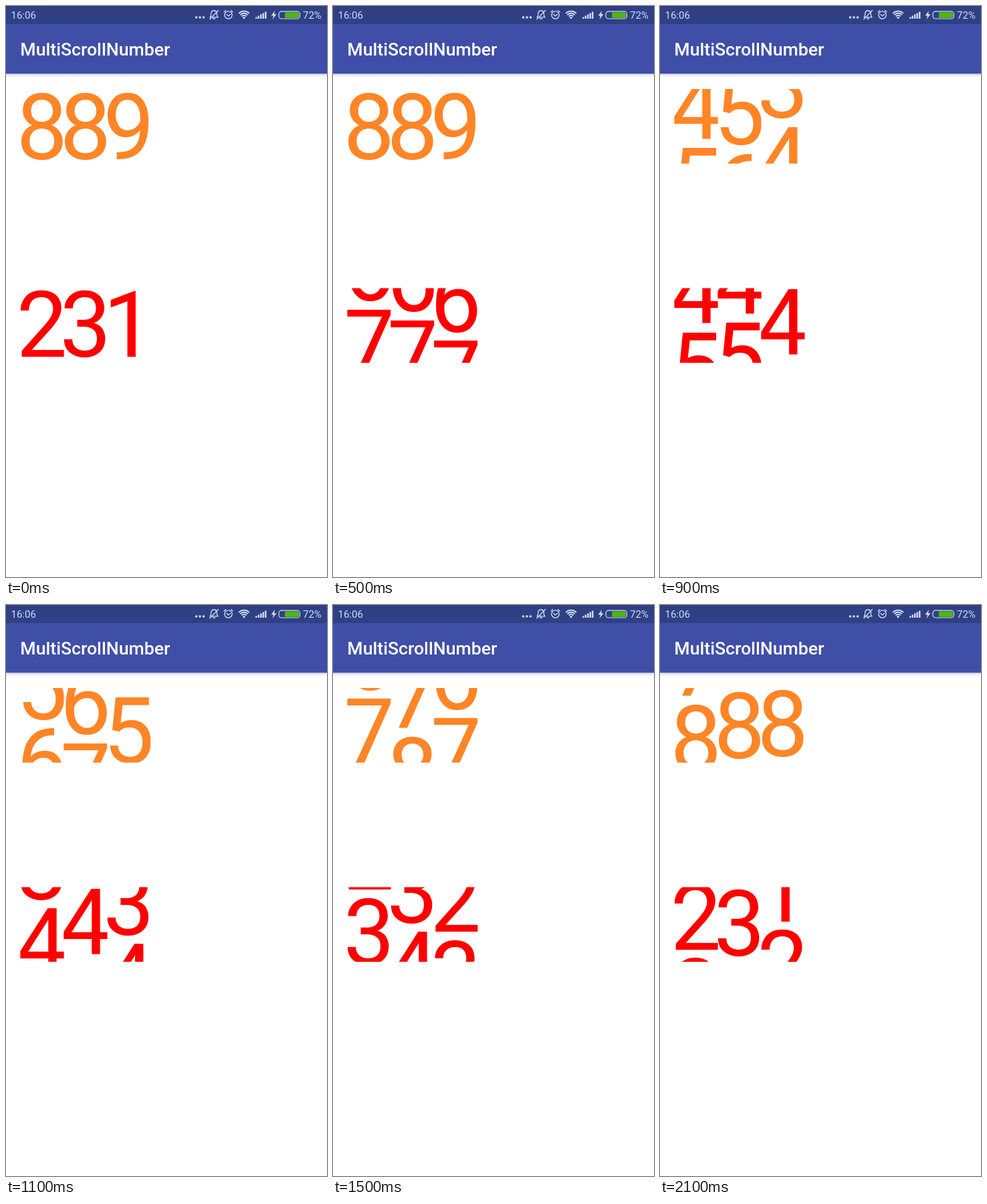
An HTML page with a canvas that plays this animation: 480x853 px, repeating every 2200 ms.

```html
<!DOCTYPE html>
<html lang="en">
<head>
<meta charset="utf-8">
<title>MultiScrollNumber</title>
<style>
html, body { margin: 0; width: 100%; height: 100%; overflow: hidden; background: #fff; }
canvas { display: block; width: 480px; height: 853px; }
</style>
</head>
<body>
<canvas id="stage" width="480" height="853"></canvas>
<script>
const ctx = document.getElementById('stage').getContext('2d');
const LOOP = 2200, STEP = 100;
const ROW = 111.5, COL = 64.9, LEFT = 21.4;
const FONT = 'Roboto, "Open Sans", sans-serif';
const INK = '#d3dcf5';

// Each reel holds its scroll position (in digits) at the counter's times.
const counters = [
  {
    color: '#ff8526', top: 124, base: 229.3,
    times: [540, 700, 1100, 1500, 1700, 2100],
    reels: [
      { goal: 8, pos: [1, 2.645, 5.525, 6.92, 7.245, 7.835] },
      { goal: 8, pos: [2, 3.64, 6.325, 7.405, 7.75, 8.45] },
      { goal: 9, pos: [0, 1.805, 4.94, 6.66, 7.205, 8.03] }
    ]
  },
  {
    color: '#ff0000', top: 421.5, base: 523.8,
    times: [220, 300, 700, 1100, 1500, 1700, 2100],
    reels: [
      { goal: 2, pos: [9, 8.36, 5.38, 3.755, 2.885, 2.61, 2.08] },
      { goal: 3, pos: [9, 8.195, 5.385, 4.02, 3.44, 3.148, 2.55] },
      { goal: 1, pos: [9, 8.028, 5.015, 3.28, 2.32, 1.955, 1.46] }
    ]
  }
];

// Monotone cubic through the points.
function spline(xs, ys, x) {
  const last = xs.length - 2;
  let i = 0;
  while (i < last && x >= xs[i + 1]) i++;
  const slope = k => (ys[k + 1] - ys[k]) / (xs[k + 1] - xs[k]);
  const tangent = k => {
    if (k === 0) return slope(0);
    if (k > last) return slope(last);
    const a = slope(k - 1), b = slope(k);
    return a * b > 0 ? 2 * a * b / (a + b) : 0;
  };
  const h = xs[i + 1] - xs[i], u = (x - xs[i]) / h, v = 1 - u;
  return v * v * (1 + 2 * u) * ys[i] + u * u * (3 - 2 * u) * ys[i + 1]
    + h * u * v * (v * tangent(i) - u * tangent(i + 1));
}

function position(reel, times, t) {
  if (t < times[0]) return reel.goal;
  const p = spline(times, reel.pos, t);
  return reel.pos[0] < reel.goal ? Math.min(p, reel.goal) : Math.max(p, reel.goal);
}

function drawCounter(c, t) {
  ctx.fillStyle = c.color;
  ctx.font = '136.5px ' + FONT;
  ctx.textAlign = 'center';
  c.reels.forEach((reel, i) => {
    const p = position(reel, c.times, t), n = Math.floor(p), x = LEFT + i * COL;
    ctx.save();
    ctx.beginPath();
    ctx.rect(x, c.top, COL + 0.3, ROW);
    ctx.clip();
    for (const d of [n, n + 1]) {
      ctx.fillText(d % 10, x + COL / 2, c.base + (d - p) * ROW);
    }
    ctx.restore();
  });
}

function label(text, x, y, font, color) {
  ctx.font = font + ' ' + FONT;
  ctx.textAlign = 'left';
  ctx.fillStyle = color;
  ctx.fillText(text, x, y);
}

function stroke(d, width = 1.4) {
  ctx.lineWidth = width;
  ctx.stroke(new Path2D(d));
}

function dot(x, y, r) {
  ctx.beginPath();
  ctx.arc(x, y, r, 0, 7);
  ctx.fill();
}

function pill(x, y, w, h, r) {
  ctx.beginPath();
  ctx.roundRect(x, y, w, h, r);
}

function drawIcons() {
  ctx.fillStyle = ctx.strokeStyle = INK;
  ctx.lineCap = ctx.lineJoin = 'round';
  for (const x of [284.5, 290, 295.5]) dot(x, 17, 1.8);

  // muted bell
  stroke('M305 16.8C307 15.5 306.5 13.5 306.7 11.5C307 5.5 315 5.5 315.3 11.5C315.5 13.5 315 15.5 317 16.8Z M309.5 19H312.5 M304.8 19.8L317.5 6.5', 1.3);

  // alarm clock
  ctx.beginPath();
  ctx.arc(332.5, 13.5, 5.6, 0, 7);
  ctx.lineWidth = 1.4;
  ctx.stroke();
  stroke('M330 12.5L332.5 15L335.5 12.5 M326 9L328.5 6.8 M339 9L336.5 6.8', 1.3);

  // wifi
  for (const r of [4, 7.2, 10.4]) {
    ctx.beginPath();
    ctx.arc(356, 18, r, -Math.PI * 0.75, -Math.PI * 0.25);
    ctx.lineWidth = 1.9;
    ctx.stroke();
  }
  dot(356, 17.6, 1.7);

  // signal
  for (let i = 0; i < 5; i++) {
    const h = 2.5 + i * 2;
    ctx.fillRect(373 + i * 3.5, 19 - h, 2.4, h);
  }

  ctx.fill(new Path2D('M402 7L396.5 14.5H400L398.5 20L404.5 12.3H401Z'));

  // battery
  pill(408, 8.2, 31.4, 10.8, 4);
  ctx.lineWidth = 1.2;
  ctx.stroke();
  pill(417, 9.5, 21, 8.2, [1, 3, 3, 1]);
  ctx.fillStyle = '#4db80e';
  ctx.fill();
}

function drawBars() {
  const shade = ctx.createLinearGradient(0, 101, 0, 107);
  shade.addColorStop(0, '#b9bddb');
  shade.addColorStop(0.4, '#ececf5');
  shade.addColorStop(1, '#ffffff');
  ctx.fillStyle = shade;
  ctx.fillRect(0, 101, 480, 6);
  ctx.fillStyle = '#3f4fa8';
  ctx.fillRect(0, 27, 480, 74);
  ctx.fillStyle = '#2f4085';
  ctx.fillRect(0, 0, 480, 27);
  label('16:06', 7.5, 19, '15px', INK);
  label('72%', 444, 19, '15px', INK);
  label('MultiScrollNumber', 21.3, 74, '500 26.67px', '#fff');
  drawIcons();
}

function draw(t) {
  ctx.fillStyle = '#fff';
  ctx.fillRect(0, 0, 480, 853);
  drawBars();
  for (const c of counters) drawCounter(c, t);
}

const start = performance.now();
function tick() {
  const t = Math.max(0, performance.now() - start) % LOOP;
  draw(Math.floor(t / STEP) * STEP);
  requestAnimationFrame(tick);
}
tick();
</script>
</body>
</html>
```
